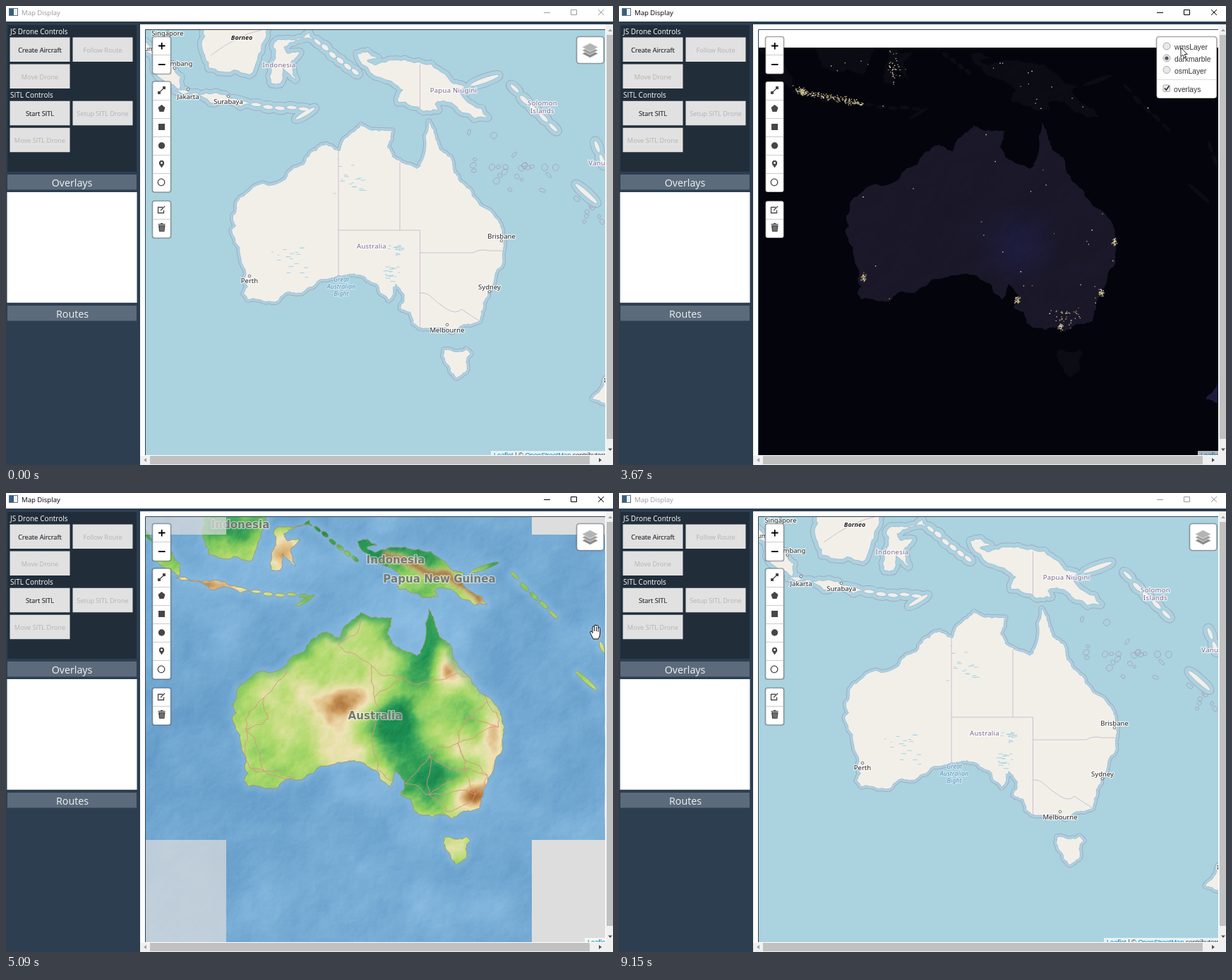
Recreate the animation shown at these times as an HTML page with a canvas. Size 860 by 651 pixels, loop 9.35 s.

```html
<!DOCTYPE html>
<html lang="en">
<head>
<meta charset="utf-8">
<title>Map Display</title>
<style>
  html, body { margin: 0; width: 100%; height: 100%; overflow: hidden; background: #2d3e50; }
  #pane { position: absolute; left: 190px; top: 26px; width: 670px; height: 625px; background: #fff; }
  #map { position: absolute; left: 198px; top: 34px; }
  svg { position: absolute; left: 0; top: 0; }
  text { font-family: "Open Sans", sans-serif; }
  .title text { font-size: 9.6px; }
  .title { color: #9a9a9a; }
  .title.active { color: #000; }
  .group { font-size: 10px; fill: #fff; }
  .head { font-size: 14.3px; fill: #f0f2f4; text-anchor: middle; }
  .btn { font-size: 9.2px; text-anchor: middle; fill: #b1b3b6; }
  .btn.on { fill: #2b2f36; stroke: #2b2f36; stroke-width: .2px; }
  .list text, .attr text { font-family: "Liberation Sans", sans-serif; }
  .list text { font-size: 10.3px; fill: #333; }
  .attr text { font-size: 9.2px; fill: #333; }
  .attr .link { fill: #0078a8; text-decoration: underline; }
  .box { fill: #fff; stroke: rgba(0,0,0,.35); stroke-width: 1.7px; }
  #click { mix-blend-mode: multiply; }
</style>
</head>
<body>
<div id="pane"></div>
<canvas id="map" width="651" height="603"></canvas>
<svg width="860" height="651" viewBox="0 0 860 651">
  <defs>
    <clipPath id="view"><rect x="198" y="34" width="651" height="603"/></clipPath>
    <path id="key" fill="#e1e1e1" d="M0 0h85v34.500h-85z"/>
    <path id="hand" fill="#fff" stroke="#111" d="M-3 10L-7 2Q-8-1-6-1Q-4.5 0-4 1.5V-6Q-4-8-2.7-8T-1.4-6V-8Q-1.4-10 0-10T1.4-8Q1.4-9.3 2.7-9.3T4-7.5V-5Q4.2-6.3 5.4-6.2T6.6-4.5V2Q6.6 6 4 10ZM-1.4-6V-1M1.4-7V-1M4-5V0"/>
    <path id="arrow" fill="#fff" stroke="#111" stroke-width=".9" d="M0 0V13L3 10.2L5 15L7.2 14L5.2 9.5H9.2Z"/>
  </defs>

  <rect width="860" height="22" fill="#fff"/>
  <rect x="4.5" y="3.5" width="12" height="10" fill="#eef4f8" stroke="#60717f"/>
  <path d="M5 4h6v9H5z" fill="#35607f"/>
  <g class="title" id="title">
    <text x="22" y="13" fill="currentColor">Map Display</text>
    <path d="M762 9.5h9M800.5 5.5h8v7h-8zM839 5l8 8M847 5l-8 8" fill="none" stroke="currentColor"/>
  </g>

  <rect x="2" y="27" width="183" height="208" fill="#212e3a"/>
  <use href="#key" x="5.500" y="44.500"/><use href="#key" x="94.500" y="44.500"/>
  <use href="#key" x="5.500" y="82.500"/>
  <use href="#key" x="5.500" y="134.800"/><use href="#key" x="94.500" y="134.800"/>
  <use href="#key" x="5.500" y="172.800"/>
  <text class="group" x="6" y="40">JS Drone Controls</text>
  <text class="group" x="6" y="130">SITL Controls</text>
  <text class="btn on" x="48" y="65.5">Create Aircraft</text>
  <text class="btn" x="137" y="65.5">Follow Route</text>
  <text class="btn" x="48" y="103.5">Move Drone</text>
  <text class="btn on" x="48" y="155.5">Start SITL</text>
  <text class="btn" x="137" y="155.5">Setup SITL Drone</text>
  <text class="btn" x="48" y="193.5">Move SITL Drone</text>
  <path fill="#5b6b7b" d="M2 239h183v21.500H2zM2 425h183v21.500H2z"/>
  <rect x="1.500" y="264" width="184" height="156.800" fill="#fff"/>
  <text class="head" x="93.5" y="256">Overlays</text>
  <text class="head" x="94" y="441.5">Routes</text>

  <path d="M197.5 637V33.5H849" fill="none" stroke="#2f4254"/>
  <path fill="#f0f0f0" d="M850 26h10v625h-10zM190 638h660v13H190z"/>
  <path fill="#c1c1c1" d="M851 41h9v573h-9zM204 638h623v12H204z"/>
  <path fill="#505050" d="M853 627.5h6l-3 3.500zM840 641v6l4-3z"/>
  <path fill="#a3a3a3" d="M853 36h6l-3-3.500zM199 641v6l-4-3z"/>

  <g class="attr" clip-path="url(#view)">
    <g id="attrOsm">
      <rect x="687" y="631" width="162" height="6" fill="#fff" opacity=".7"/>
      <text x="691" y="640"><tspan class="link">Leaflet</tspan> | © <tspan class="link">OpenStreetMap</tspan> contributors</text>
    </g>
    <g id="attrPlain">
      <rect x="820" y="631" width="29" height="6" fill="#fff" opacity=".7"/>
      <text x="824" y="640"><tspan class="link">Leaflet</tspan></text>
    </g>
  </g>

  <rect class="box" x="207.500" y="43.500" width="26" height="53" rx="3"/>
  <rect class="box" x="207.500" y="107" width="26" height="157" rx="3"/>
  <rect class="box" x="207.500" y="276.500" width="26" height="52.500" rx="3"/>
  <path stroke="#ccc" d="M208 69.500h25M208 133.500h25M208 159.500h25M208 185.500h25M208 211.500h25M208 237.500h25M208 302.500h25"/>
  <path stroke="#000" stroke-width="1.800" d="M216 56.500h9.500M220.700 52v9.500M216 83h9.500"/>
  <g fill="#464646">
    <path d="M215 121h4v4h-4zM222 114h4v4h-4zM220.500 140l5 4-2 6h-6l-2-6zM216 167h9v9h-9z"/>
    <circle cx="220.500" cy="198" r="4.700"/>
    <path fill-rule="evenodd" d="M220.500 229.500L217 224.500Q216 219 220.500 219T224 224.500ZM219 222.500a1.500 1.500 0 1 0 3 0a1.500 1.500 0 1 0-3 0"/>
    <path d="M216 311h9.500l-1 9h-7.500zM215.500 309h10v1.300h-10zM219 308h3v1h-3z"/>
  </g>
  <g fill="none" stroke="#464646" stroke-width="1.300">
    <path d="M217 123l7-7M222 285.500h-6.500v8h8v-4M219 290l6-6"/>
    <circle cx="220" cy="250" r="4.800"/>
    <path stroke="#bbb" stroke-width=".7" d="M219 312v7M221 312v7M223 312v7"/>
  </g>

  <g id="toggle">
    <rect class="box" x="808.500" y="43.500" width="38.500" height="38" rx="4"/>
    <g stroke="#fff" stroke-width=".6">
      <path fill="#8b8b8b" d="M816 67.500l11.500-6 11.500 6-11.500 6z"/>
      <path fill="#a0a0a0" d="M816 63l11.500-6 11.500 6-11.500 6z"/>
      <path fill="#b4b4b4" d="M816 58.500l11.500-6 11.500 6-11.500 6z"/>
    </g>
  </g>
  <g class="list" id="list">
    <rect class="box" x="761.500" y="43.500" width="85.500" height="87.500" rx="4"/>
    <path stroke="#ddd" d="M762 104.500h84"/>
    <g fill="#e9e9e9" stroke="#a9a9a9">
      <circle cx="776" cy="57" r="5"/><circle cx="776" cy="74" r="5"/><circle cx="776" cy="90.500" r="5"/>
      <rect x="771" y="112" width="9.500" height="9.500" rx="1.500"/>
    </g>
    <circle id="dot" cx="776" r="2.600" fill="#555"/>
    <path d="M773 116.500l2.300 2.700 4.200-6" fill="none" stroke="#333" stroke-width="1.700"/>
    <text x="787" y="61.500">wmsLayer</text>
    <text x="787" y="78.500">darkmarble</text>
    <text x="787" y="95.500">osmLayer</text>
    <text x="786" y="121.500">overlays</text>
  </g>
  <g id="pointer">
    <circle id="click" r="10.500" fill="#fff566"/>
    <use id="shape"/>
  </g>
</svg>
<script>
const LOOP = 9350, FRAMES = 46, W = 651, H = 603, LEFT = 198, TOP = 34;
const $ = id => document.getElementById(id);
const clamp = v => Math.min(1, Math.max(0, v));
const ease = v => v * v * (3 - 2 * v);
const points = s => s.split(' ').map(p => p.split(',').map(Number));

let seed = 11;
const rnd = () => {
  seed = seed + 0x6D2B79F5 | 0;
  let r = Math.imul(seed ^ seed >>> 15, 1 | seed);
  r ^= r + Math.imul(r ^ r >>> 7, 61 | r);
  return ((r ^ r >>> 14) >>> 0) / 4294967296;
};
const spread = () => rnd() + rnd() + rnd() - 1.5;

// Midpoint displacement turns a few points into a jagged line.
function jagged(pts, closed = true, k = .16, rounds = 3) {
  while (rounds--) pts = pts.flatMap((p, i) => {
    if (!closed && i == pts.length - 1) return [p];
    const q = pts[(i + 1) % pts.length], d = (rnd() - .5) * 2 * k;
    return [p, [(p[0] + q[0]) / 2 + (q[1] - p[1]) * d, (p[1] + q[1]) / 2 - (q[0] - p[0]) * d]];
  });
  const path = new Path2D();
  pts.forEach(p => path.lineTo(...p));
  if (closed) path.closePath();
  return path;
}
const coast = s => jagged(points(s));
const australia = coast('599,164 606,180 615,205 629,214 634,236 642,248 658,262 664,273 697,304 706,330 703,356 683,404 676,420 671,447 645,453 632,462 620,456 604,460 586,456 577,449 573,434 559,428 565,410 558,400 552,394 548,406 542,417 524,393 510,385 493,379 470,382 434,398 420,406 400,405 368,419 343,416 337,408 343,398 332,352 320,318 326,312 322,297 327,280 340,267 393,248 404,234 432,208 447,198 472,206 478,191 503,169 522,176 547,177 540,200 560,222 582,231 590,220');
const tasmania = coast('621,488 640,491 652,487 658,493 651,519 638,527 630,518');
const newZealand = coast('831,557 850,528 865,526 865,575 848,563');
const newGuinea = coast('498,68 512,65 526,74 511,77 524,84 552,77 578,81 622,97 650,116 641,120 682,158 648,151 634,139 621,134 607,139 612,147 592,149 556,136 563,119 546,106');
const borneo = coast('280,28 372,28 361,64 345,97 300,92 288,88 278,58');
const sulawesi = coast('377,110 376,88 382,70 379,56 388,48 410,49 429,38 434,47 393,58 399,68 416,66 404,78 410,104 392,86 388,110');
const java = coast('240,120 275,126 310,126 345,139 332,142 290,137');
const sumatra = coast('190,48 236,84 247,100 245,118 213,96');

// A chain of slim islands between two points.
function chain(x, y, u, v, n) {
  return Array.from({ length: n }, (_, i) => {
    const path = new Path2D(), len = Math.hypot(u - x, v - y) / n, mid = (i + .5) / n;
    path.ellipse(x + (u - x) * mid, y + (v - y) * mid + spread() * (n - 1) / 2, len * .42, 2.2 + rnd(), Math.atan2(v - y, u - x), 0, 7);
    return path;
  });
}
const islands = [
  newGuinea, borneo, sulawesi, java, sumatra,
  ...chain(346, 140, 430, 147, 5), ...chain(408, 162, 440, 143, 1), ...chain(436, 46, 500, 98, 6),
  ...chain(654, 114, 702, 97, 1), ...chain(714, 112, 782, 178, 5), ...chain(834, 190, 848, 228, 2),
  ...chain(804, 250, 840, 282, 1)
];
const mainland = [australia, tasmania, newZealand];
const lands = new Path2D();
[...mainland, ...islands].forEach(p => lands.addPath(p));

function layer(paint) {
  const c = document.createElement('canvas');
  c.width = W; c.height = H;
  const g = c.getContext('2d');
  g.translate(-LEFT, -TOP);
  g.lineJoin = 'round';
  paint(g);
  return c;
}
function fill(g, color) { g.fillStyle = color; g.fillRect(LEFT, TOP, W, H); }
function stroke(g, path, color, width) { g.strokeStyle = color; g.lineWidth = width; g.stroke(path); }
function within(g, path, paint) { g.save(); g.clip(path); paint(); g.restore(); }
function label(g, text, x, y, font, color, halo = '#ffffffcc', width = 2.4) {
  g.font = font; g.textAlign = 'center'; g.lineWidth = width;
  g.strokeStyle = halo; g.strokeText(text, x, y);
  g.fillStyle = color; g.fillText(text, x, y);
}

function hash(x, y) {
  let h = Math.imul(x, 374761393) + Math.imul(y, 668265263) | 0;
  h = Math.imul(h ^ h >>> 13, 1274126177);
  return ((h ^ h >>> 16) >>> 0) / 4294967296;
}
function noise(x, y) {
  const i = Math.floor(x), j = Math.floor(y), u = ease(x - i), v = ease(y - j);
  const a = hash(i, j), b = hash(i + 1, j), c = hash(i, j + 1), d = hash(i + 1, j + 1);
  return a + (b - a) * u + (c - a + (a - b - c + d) * u) * v;
}
const height = new Float32Array(W * H);
for (let o = 0, f = 1 / 55, a = .51; o < 5; o++, f *= 2, a /= 2)
  for (let i = 0; i < height.length; i++) height[i] += a * noise((i % W) * f + o * 9, Math.floor(i / W) * f);

function pixels(color) {
  return layer(g => {
    const img = g.createImageData(W, H);
    for (let i = 0; i < height.length; i++) img.data.set(color(i), i * 4);
    g.putImageData(img, 0, 0);
  });
}
// Hillshade; mid grey is neutral under "overlay".
const relief = pixels(i => {
  const v = 128 + (height[i] - (height[i + W + 1] ?? height[i])) * 520;
  return [v, v, v, 255];
});
function shade(g, alpha) {
  g.save();
  g.globalCompositeOperation = 'overlay';
  g.globalAlpha = alpha;
  g.drawImage(relief, LEFT, TOP);
  g.restore();
}
// Noise plus broad hills (x, y, radii, rise), coloured by a ramp from low to high.
function terrain(base, roughness, hills, colors) {
  let ramp;
  layer(g => {
    const fade = g.createLinearGradient(LEFT, 0, LEFT + 256, 0);
    colors.forEach((c, i) => fade.addColorStop(i / (colors.length - 1), c));
    fill(g, fade);
    ramp = g.getImageData(0, 0, 256, 1).data;
  });
  return pixels(i => {
    const x = LEFT + i % W, y = TOP + Math.floor(i / W);
    let e = base + (height[i] - .5) * roughness;
    for (const [hx, hy, rx, ry, rise] of hills) e += rise * Math.exp(-(((x - hx) / rx) ** 2) - ((y - hy) / ry) ** 2);
    const k = Math.floor(clamp(e) * 255) * 4;
    return [ramp[k], ramp[k + 1], ramp[k + 2], 255];
  });
}

const osm = layer(g => {
  const sea = '#aad3df', land = '#f2efe9', border = '#a59bb9';
  fill(g, sea);
  islands.forEach(p => stroke(g, p, border, 13));
  mainland.forEach(p => stroke(g, p, border, 9));
  for (let i = 0; i < 34; i++) {
    const a = rnd(), ring = new Path2D();
    ring.ellipse(660 + a * 190 + spread() * 16, 212 + a * 70 + spread() * 40, 2 + rnd() * 3, 2 + rnd() * 3, rnd() * 3, 0, 7);
    stroke(g, ring, border, .8);
  }
  islands.forEach(p => stroke(g, p, sea, 11.500));
  mainland.forEach(p => stroke(g, p, sea, 7.500));
  stroke(g, lands, '#a9bfd6', 2);
  g.fillStyle = land;
  g.fill(lands);
  stroke(g, new Path2D('M471 204V382M471 318H586.500M558 222V318M586.500 318V456M586.500 350H662Q671 344 684 347H705M586 407Q596 406 604 414T625 430 645 430L671 447M586.500 83V147M290 70Q330 40 362 34'), '#cbb8cc', .9);
  g.fillStyle = '#a5d3e2';
  within(g, lands, () => {
    for (const [x, y, size] of [[552, 345, 9], [542, 378, 12], [403, 365, 26], [490, 245, 28]])
      for (let i = 0; i < 18; i++) g.fillRect(x + spread() * size, y + spread() * size, 2 + rnd() * 5, 1);
    g.fillRect(548, 398, 7, 14);
  });

  const font = '9.5px "Noto Sans", sans-serif', country = '#77658a', town = '#222';
  g.letterSpacing = '.3px';
  for (const [name, x, y] of [['Indonesia', 387, 87], ['Papua Niugini', 634, 123], ['Solomon', 760, 141], ['Islands', 760, 152], ['Vanuatu', 845, 226], ['Australia', 518, 344]])
    label(g, name, x, y, font, country);
  g.letterSpacing = '0px';
  for (const [name, x, y, dy] of [['Singapore', 229, 42, -5], ['Jakarta', 258, 132, -14], ['Surabaya', 315, 139, -11], ['Brisbane', 702, 330, 3], ['Sydney', 685, 402, 3], ['Melbourne', 625, 463, -11], ['Perth', 345, 393, -10], ['Palembang', 239, 85, 3]]) {
    g.beginPath(); g.arc(x, y + dy, 1.8, 0, 7);
    g.fillStyle = '#fff'; g.fill();
    g.strokeStyle = '#555'; g.lineWidth = .8; g.stroke();
    label(g, name, x, y, font, town);
  }
  label(g, 'um', 203, 64, font, town);
  const italic = '9px "Noto Sans", sans-serif';
  ['Great', 'Australian', 'Bight'].forEach((s, i) => label(g, s, 475, 391 + i * 10, 'italic ' + italic, '#5a96bf', '#ffffff66'));
  label(g, 'Borneo', 334, 48, 'italic 600 ' + italic, town);
  label(g, 'Te', 851, 534, 'italic 600 ' + italic, town);
});

const dark = layer(g => {
  fill(g, '#04040c');
  within(g, lands, () => {
    fill(g, '#0a0b13');
    g.fillStyle = '#1a1729'; g.fill(australia);
    g.fillStyle = '#1c1a3c'; g.fill(newZealand);
    const basin = g.createRadialGradient(565, 340, 0, 565, 340, 60);
    basin.addColorStop(0, '#1d1d40'); basin.addColorStop(1, '#1d1d4000');
    fill(g, basin);
    shade(g, .5);
  });
  const light = (x, y) => {
    g.fillStyle = `hsl(45 40% ${45 + rnd() * 50}%)`;
    g.fillRect(x, y, 1 + rnd() * .6, 1 + rnd() * .6);
  };
  for (const [x, y] of points('346,384 683,406 625,454 702,335 564,416 259,121'))
    for (let i = 0; i < 34; i++) light(x + spread() * 3.500, y + spread() * 5);
  for (let i = 0; i < 190; i++) {
    const x = 250 + rnd() * 95;
    light(x, 119 + (x - 250) * .2 + spread() * 5);
  }
  for (let i = 0; i < 40; i++) light(632 + spread() * 24, 440 + spread() * 14);
  for (let i = 0; i < 30; i++) light(390 + spread() * 9, 88 + spread() * 16);
  for (let i = 0; i < 700; i++) {
    const x = LEFT + rnd() * W, y = 60 + rnd() * 460, chance = y < 160 ? 1 : x > 640 ? .5 : .12;
    if (rnd() < chance && g.isPointInPath(lands, x - LEFT, y - TOP)) light(x, y);
  }
  g.fillStyle = '#fff';
  g.fillRect(LEFT, TOP, W, 25);
});

const wms = layer(g => {
  const sea = terrain(.5, .8, [
    [270, 460, 140, 100, -.25], [580, 190, 80, 60, .4], [440, 110, 150, 60, .15], [500, 580, 200, 90, .15]
  ], ['#5f97c4', '#74aad3', '#8bbde3']);
  const ground = terrain(.4, .7, [
    [385, 305, 75, 75, .22], [495, 290, 55, 24, .3], [562, 325, 36, 52, -.5], [602, 405, 46, 36, -.38],
    [594, 205, 26, 46, -.42], [690, 350, 16, 60, .35], [657, 430, 26, 20, .42], [622, 252, 16, 32, .25],
    [460, 60, 400, 75, -.25], [300, 130, 130, 12, .4], [395, 75, 30, 45, .45], [640, 507, 30, 24, .25]
  ], ['#1d8f52', '#43aa5a', '#86cb60', '#aed96c', '#cfdf8c', '#efe2b6', '#dcb67c', '#b0743a', '#70431c']);
  g.drawImage(sea, LEFT, TOP);
  g.save();
  g.filter = 'blur(4px)';
  stroke(g, lands, '#8bbde388', 12);
  g.restore();
  shade(g, .45);
  within(g, lands, () => {
    g.drawImage(ground, LEFT, TOP);
    const rim = g.createLinearGradient(0, 170, 0, 320);
    rim.addColorStop(0, '#36a257dd'); rim.addColorStop(1, '#36a25700');
    g.save();
    g.filter = 'blur(3px)';
    stroke(g, australia, rim, 14);
    const ridge = jagged(points('535,88 575,100 625,114 645,130 672,156'), false);
    stroke(g, ridge, '#e6cf91', 13);
    stroke(g, ridge, '#82501f', 5);
    g.restore();
    shade(g, .9);
  });
  stroke(g, lands, '#a48f68', .8);

  // Roads join neighbouring towns.
  const towns = points('345,390 340,335 372,320 366,290 398,252 366,395 408,404 470,215 505,178 518,245 522,290 520,340 526,392 560,262 602,268 640,255 682,296 698,332 652,320 640,355 650,390 682,400 600,372 566,412 600,428 624,452 665,428');
  within(g, australia, () => towns.forEach((a, i) => towns.slice(0, i).forEach(b => {
    if (Math.hypot(a[0] - b[0], a[1] - b[1]) < 66) stroke(g, jagged([a, b], false), '#dc9180', .9);
  })));

  const font = 'bold 15.1px "DejaVu Sans", sans-serif';
  for (const [name, x, y] of [['Indonesia', 332, 49.5], ['Indonesia', 552, 100], ['Papua New Guinea', 614, 127], ['Australia', 523, 320.500]])
    label(g, name, x, y, font, '#75796f', '#ffffff88', 2.6);
});

// Tiles arrive in waves, one digit per tile.
const waves = ['2013', '1000', '1001', '2113'], TILE = 216.3;
const columns = [0, 1, 2, 3, 4].map(i => Math.round(Math.min(W, Math.max(0, 114 + (i - 1) * TILE))));
const rows = [0, 1, 2, 3, 4].map(i => Math.round(Math.min(H, Math.max(0, 25 + (i - 1) * TILE))));

// Pointer path in frames; it rests where a point repeats.
const path = points('2,836,354 4,828,140 7,800,71 8,800,72 9,808,131 10,812,176 12,812,176 15,822,66 18,796,59 19,796,58 21,835,197 28,835,197 31,824,66 34,819,91 38,819,91 39,824,105 42,841,593');
const clicks = [7, 19, 34];
function pointerAt(f) {
  const i = path.findLastIndex(p => p[0] <= f), [f0, x, y] = path[i], [f1, u, v] = path[i + 1] ?? path[i];
  const k = f1 > f0 ? ease((f - f0) / (f1 - f0)) : 0;
  return [x + (u - x) * k, y + (v - y) * k];
}

const ctx = $('map').getContext('2d');
const show = (id, on) => $(id).style.display = on ? '' : 'none';

function drawMap(f, name) {
  ctx.globalAlpha = 1;
  ctx.fillStyle = '#ddd';
  ctx.fillRect(0, 0, W, H);
  if (name != 'wms') {
    ctx.globalAlpha = name == 'dark' ? clamp(f - 7.5) : f < 8 ? 1 : clamp(f - 34.5);
    ctx.drawImage(name == 'dark' ? dark : osm, 0, 0);
    return;
  }
  waves.forEach((row, r) => [...row].forEach((wave, c) => {
    const x = columns[c], y = rows[r], w = columns[c + 1] - x, h = rows[r + 1] - y;
    ctx.globalAlpha = clamp(f - 22.2 - wave * 1.26);
    ctx.drawImage(wms, x, y, w, h, x, y, w, h);
  }));
}

function draw(f) {
  const name = f < 8 || f >= 35 ? 'osm' : f < 19 ? 'dark' : 'wms';
  const inside = f >= 2 && f <= 42;
  const [x, y] = inside ? pointerAt(f) : [0, H];
  drawMap(f, name);
  $('title').classList.toggle('active', f >= 2 && f < 45);
  show('attrOsm', name == 'osm');
  show('attrPlain', name != 'osm');
  show('list', y <= 131);
  show('toggle', y > 131);
  $('dot').setAttribute('cy', { wms: 57, dark: 74, osm: 90.5 }[name]);
  show('pointer', inside);
  show('click', clicks.includes(f));
  $('pointer').setAttribute('transform', `translate(${x} ${y})`);
  $('shape').setAttribute('href', y < 100 ? '#arrow' : '#hand');
}

let shown;
function tick() {
  const f = Math.floor(performance.now() % LOOP / LOOP * FRAMES);
  if (f != shown) draw(shown = f);
  requestAnimationFrame(tick);
}
tick();
</script>
</body>
</html>
```
